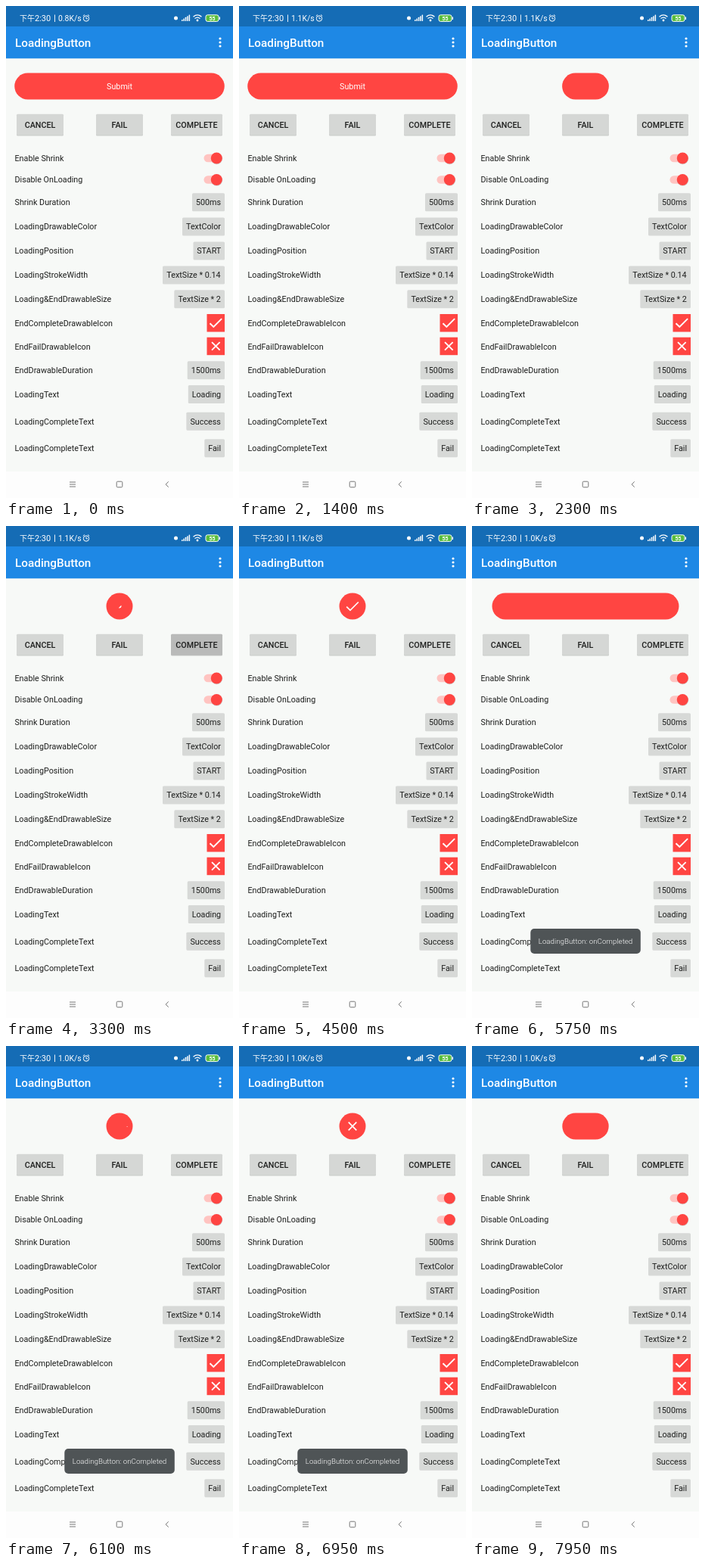
Write an HTML page that moves like this. It is 300 by 650 pixels and loops after 8000 ms.

```html
<!DOCTYPE html>
<html>
<head>
<meta charset="utf-8">
<style>
  html, body { margin: 0; width: 100%; height: 100%; overflow: hidden; background: #f7f9f7; }
  svg { display: block; font: 10.75px Roboto, "Noto Sans CJK SC", sans-serif; fill: #1e1f1e; }
  .white { fill: #fff; }
  .line { fill: none; stroke: #fff; }
  .mid { text-anchor: middle; }
  .end { text-anchor: end; }
  .medium { font-weight: 500; }
  .red { fill: #ff4542; }
</style>
</head>
<body>
<svg id="stage" width="300" height="650" viewBox="0 0 300 650"></svg>
<script>
const LOOP = 8000, FULL = 277.5, SMALL = 35, CX = 150, CY = 106;

const rect = (x, y, w, h, r, attrs) =>
  `<rect x="${x}" y="${y}" width="${w}" height="${h}" rx="${r}" ${attrs}/>`;
const text = (x, y, s, attrs = '') => `<text x="${x}" y="${y}" ${attrs}>${s}</text>`;
const dot = (x, y, r, attrs = 'class="white"') => `<circle cx="${x}" cy="${y}" r="${r}" ${attrs}/>`;
const line = (d, w, attrs = '') => `<path d="${d}" class="line" stroke-width="${w}" ${attrs}/>`;

const statusBar = () =>
  rect(0, 0, 300, 27, 0, 'fill="#156cb5"') +
  text(18, 20, '下午', 'class="white" font-size="10"') +
  text(38, 20, '2:30', 'class="white" font-size="11"') +
  line('M64.5 11.5V21', 0.9) +
  text(69, 20, '', 'id="speed" class="white" font-size="10.4"') +
  dot(106, 16.5, 3.7, 'class="line"') +
  line('M106 14.3V16.8H108M101.8 13.2L104 11.4M110.2 13.2L108 11.4', 0.9) +
  dot(224.5, 16, 2.5) +
  [0, 1, 2, 3, 4].map(i => rect(232 + i * 2.4, 18 - i * 1.6, 1.5, 2 + i * 1.6, 0.4, 'class="white"')).join('') +
  line('M247.5 14.2Q253 9.6 258.5 14.2M249.5 16.6Q253 13.8 256.5 16.6', 1.3) +
  dot(253, 19, 1.4) +
  rect(264, 11.8, 17, 8.6, 2.4, 'fill="#58bd3c" stroke="#fff" stroke-width="1"') +
  rect(281.8, 14.3, 1.2, 3.6, 0.5, 'class="white"') +
  text(272.5, 18.6, '55', 'class="white mid" font-size="7" font-weight="700"');

const appBar = () =>
  rect(0, 27, 300, 42.3, 0, 'fill="#1e88e5"') +
  text(12, 54, 'LoadingButton', 'class="white medium" font-size="15.3"') +
  [43, 48, 53].map(y => dot(283, y, 1.6)).join('');

const button = (x, w, label) =>
  rect(x, 143.4, w, 28, 1.5, 'fill="#c5c7c5"') +
  rect(x, 142.8, w, 28, 1.5, 'fill="#d5d7d5"') +
  rect(x, 142.8, w, 28, 1.5, `id="press${label}" fill="#000" opacity="0"`) +
  text(x + w / 2, 160.8, label, 'class="mid medium"');

const toggle = y =>
  rect(261.5, y - 5.3, 23, 10.6, 5.3, 'fill="#ffc4c1"') +
  dot(278.5, y + 0.6, 7.7, 'fill="#000" opacity=".16"') +
  dot(278.3, y, 7.5, 'class="red"');

const chip = (y, x, label) =>
  rect(x, y - 12, 289 - x, 24, 1.6, 'fill="#d7d9d7"') +
  text((x + 289) / 2, y + 3.8, label, 'class="mid"');

const iconBox = (y, d) =>
  rect(265.5, y - 12, 23.5, 23.5, 0, 'class="red"') +
  line(d, 1.9, `transform="translate(277.3 ${y - 0.3})"`);

const CHECK = 'M-7.8 .6L-3 5.3L7.8 -5.5', CROSS = 'M-5.3 -5.3L5.3 5.3M5.3 -5.3L-5.3 5.3';

const rows = [
  ['Enable Shrink', 201, toggle],
  ['Disable OnLoading', 229.5, toggle],
  ['Shrink Duration', 259.3, chip, 246, '500ms'],
  ['LoadingDrawableColor', 291.5, chip, 233, 'TextColor'],
  ['LoadingPosition', 323.5, chip, 247.5, 'START'],
  ['LoadingStrokeWidth', 355.5, chip, 207, 'TextSize * 0.14'],
  ['Loading&amp;EndDrawableSize', 387.3, chip, 222.3, 'TextSize * 2'],
  ['EndCompleteDrawableIcon', 419, iconBox, CHECK],
  ['EndFailDrawableIcon', 449.7, iconBox, CROSS],
  ['EndDrawableDuration', 481.3, chip, 239.7, '1500ms'],
  ['LoadingText', 513, chip, 240.8, 'Loading'],
  ['LoadingCompleteText', 548.7, chip, 238.3, 'Success'],
  ['LoadingCompleteText', 584.2, chip, 262.3, 'Fail'],
];

const navBar = () =>
  rect(0, 615, 300, 35, 0, 'fill="#fdfdfd"') +
  line('M84 629H92M84 632H92M84 635H92M214.7 628.3L211.2 632L214.7 635.7', 0.9, 'style="stroke:#666"') +
  rect(146.2, 628.2, 7.6, 7.6, 1.4, 'fill="none" stroke="#666" stroke-width=".9"');

stage.innerHTML =
  `<clipPath id="reveal"><circle id="hole" cx="${CX}" cy="${CY}" r="0"/></clipPath>` +
  statusBar() + appBar() +
  rect(0, 88.5, 0, SMALL, SMALL / 2, 'id="pill" class="red"') +
  rect(11.2, 88.5, FULL, SMALL, SMALL / 2, 'id="pressSubmit" fill="#000" opacity="0"') +
  text(CX, 109.8, 'Submit', 'id="submit" class="white mid"') +
  line('', 1.5, 'id="spinner"') +
  `<g clip-path="url(#reveal)">${line('', 1.7, `id="icon" transform="translate(${CX} ${CY})"`)}</g>` +
  button(14, 62, 'CANCEL') + button(119, 62, 'FAIL') + button(218, 68, 'COMPLETE') +
  rows.map(([label, y, part, ...args]) => text(11.5, y + 3.8, label) + part(y, ...args)).join('') +
  navBar() +
  `<g id="toast">${rect(77.3, 532, 145.5, 33, 5, 'fill="#4f5456"')}` +
  text(CX, 552, 'LoadingButton: onCompleted', 'class="white mid" font-size="9.75" font-weight="300"') + '</g>';

const $ = id => document.getElementById(id);
const ramp = (t, from, length) => Math.min(1, Math.max(0, (t - from) / length));
const inOut = x => (1 - Math.cos(Math.PI * x)) / 2;
const pulse = (t, from, length) => Math.sin(Math.PI * ramp(t, from, length));

// cubic-bezier(.4, 0, .2, 1)
function fastOutSlowIn(x) {
  let lo = 0, hi = 1;
  for (let i = 0; i < 20; i++) {
    const s = (lo + hi) / 2, r = 1 - s;
    if (1.2 * r * r * s + 0.6 * r * s * s + s ** 3 < x) lo = s; else hi = s;
  }
  return 3 * (1 - lo) * lo * lo + lo ** 3;
}

function spinnerPath(ms) {
  const p = ms / 1332 % 1, R = 10.2;
  let from = 0, to = 0.8;
  if (p < 0.5) to = 0.79 * fastOutSlowIn(p * 2) + 0.01;
  else from = to - 0.79 * (1 - fastOutSlowIn(p * 2 - 1)) - 0.01;
  const at = turn => {
    const a = (turn + 0.81 * p) * 2 * Math.PI;
    return `${CX + R * Math.cos(a)} ${CY + R * Math.sin(a)}`;
  };
  return `M${at(from)}A${R} ${R} 0 ${to - from > 0.5 ? 1 : 0} 1 ${at(to)}`;
}

const SHRINK = 450, EXPAND = 500;
const runs = [
  { start: 1948, done: 3150, expand: 4650, icon: CHECK },
  { start: 5647, done: 6345, expand: 7844, icon: CROSS },
];

function draw(t) {
  const run = runs.find(r => t >= r.start && t < r.expand + EXPAND);
  let width = FULL, spin = '', radius = 0;
  if (run) {
    const closed = inOut(ramp(t, run.start, SHRINK)) - inOut(ramp(t, run.expand, EXPAND));
    width = FULL - (FULL - SMALL) * closed;
    if (t >= run.start + SHRINK && t < run.done) spin = spinnerPath(t - run.start - SHRINK);
    if (t < run.expand) radius = 12 * inOut(ramp(t, run.done, 500));
    $('icon').setAttribute('d', run.icon);
  }
  $('pill').setAttribute('x', CX - width / 2);
  $('pill').setAttribute('width', width);
  $('submit').style.opacity = run ? 0 : 1;
  $('spinner').setAttribute('d', spin);
  $('hole').setAttribute('r', radius);
  $('pressSubmit').style.opacity = 0.12 * (pulse(t, 1720, 228) + pulse(t, 5420, 227));
  $('pressCOMPLETE').style.opacity = 0.14 * pulse(t, 3000, 500);
  $('pressFAIL').style.opacity = 0.14 * pulse(t, 6200, 500);
  $('toast').style.opacity = inOut(ramp(t, 5200, 260)) - inOut(ramp(t, 7230, 270));
  $('speed').textContent = t < 1300 ? '0.8K/s' : t < 5300 ? '1.1K/s' : '1.0K/s';
  if (t < 5300) $('toast').style.opacity = 0;
}

const begin = performance.now();
function frame() {
  draw((performance.now() - begin) % LOOP);
  requestAnimationFrame(frame);
}
frame();
</script>
</body>
</html>
```
